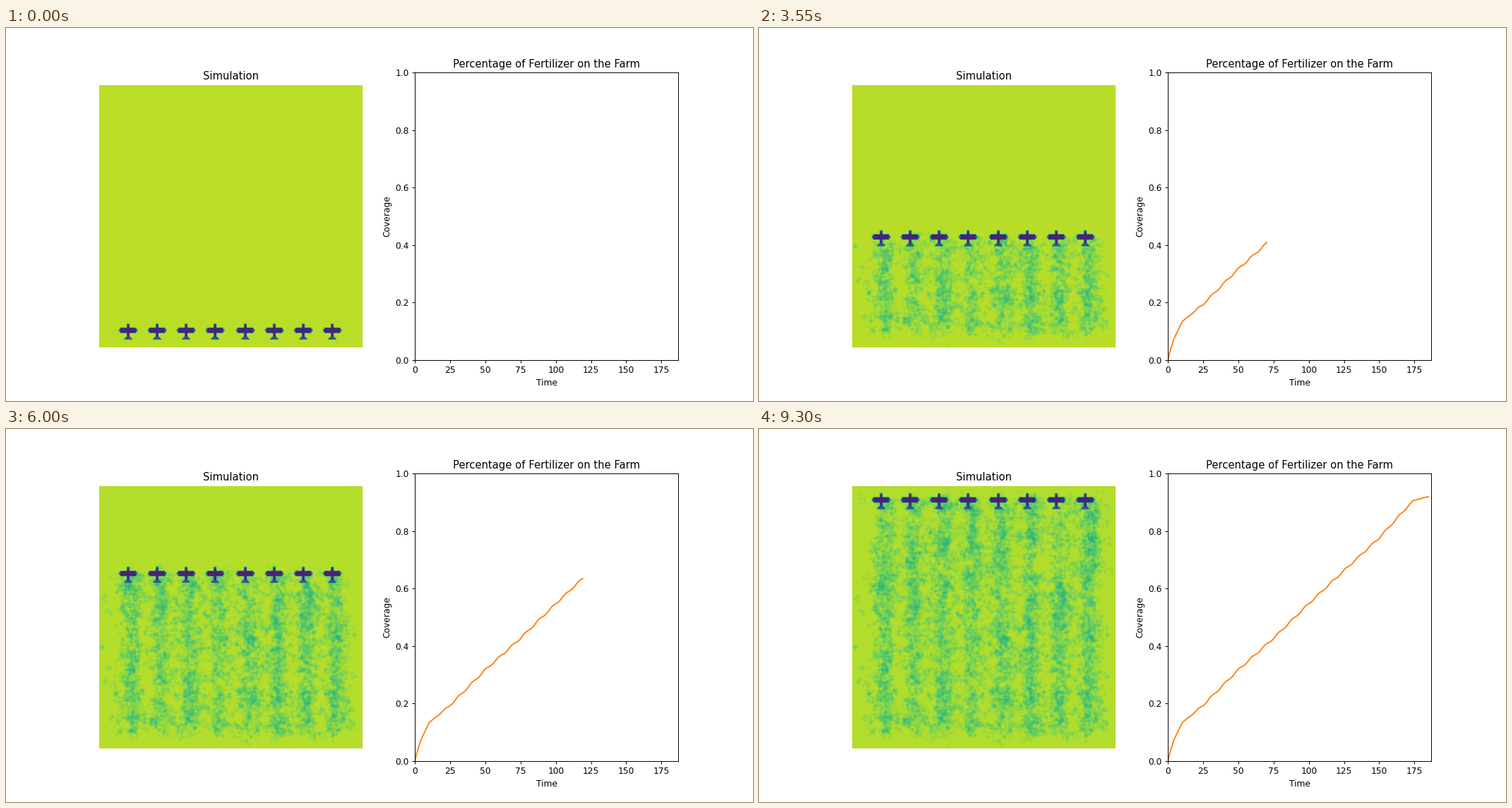
A matplotlib script for the animation above (9350 ms loop, 1058 by 529 pixels).

```python
import numpy as np
import matplotlib.pyplot as plt
from matplotlib.animation import FuncAnimation

FRAMES, INTERVAL = 187, 50
N = 200                      # field is N x N cells
START_ROW, LAST_STEP = 182, 176
PLANE_COLS = [15 + 22 * k + (k > 3) for k in range(8)]
BODY, EDGE = 0.1, 0.24
DROPS = 5                    # drops in one puff of spray
rng = np.random.default_rng(7)


def make_plane():
    """Plane sprite, 12 x 14 cells; NaN is see-through."""
    s = np.full((12, 14), np.nan)
    s[:, 6:8] = BODY
    s[0, 6:8] = EDGE
    s[3:7, 1:13] = BODY
    s[4:6, [0, 13]] = 0.32
    s[10, 5:9] = EDGE
    s[11, 4:10] = EDGE
    return s


def plane_row(i):
    return START_ROW - min(i, LAST_STEP)


def smooth_gain():
    """Strength of one plane's spray, drifting over time."""
    knots = np.arange(0, FRAMES + 7, 7)
    return np.interp(times, knots, rng.uniform(0.9, 3.1, knots.size))


def drops(col, row, rate):
    """Drop positions for one plane in one frame, clustered in puffs."""
    puffs = rng.poisson(rate)
    wide = rng.random(puffs) < 0.3
    far = rng.random(puffs) < 0.05
    px = col + 9.5 + rng.normal(size=puffs) * np.where(wide, 8, 3.6)
    py = row + 6.5 + rng.normal(size=puffs) * np.where(far, 6, 2.6)
    x = np.repeat(px, DROPS) + rng.normal(0, 1.7, puffs * DROPS)
    y = np.repeat(py, DROPS) + rng.normal(0, 1.7, puffs * DROPS)
    return np.rint(x).astype(int), np.rint(y).astype(int)


def splash(grid, x, y):
    """Add plus-shaped drops to the grid."""
    for dx, dy in [(0, 0), (1, 0), (-1, 0), (0, 1), (0, -1)]:
        cx, cy = x + dx, y + dy
        ok = (cx >= 0) & (cx < N) & (cy >= 0) & (cy < N)
        np.add.at(grid, (cy[ok], cx[ok]), 0.6 if dx or dy else 1)


def simulate():
    """Amount of fertilizer on every cell, for each frame."""
    gains = [smooth_gain() for _ in PLANE_COLS]
    amount = np.zeros((N, N))
    history = [amount.copy()]
    for i in range(1, FRAMES):
        fade = 0.25 if i > LAST_STEP else 1
        for col, gain in zip(PLANE_COLS, gains):
            splash(amount, *drops(col, plane_row(i), gain[i] * fade))
        history.append(amount.copy())
    return history


def field(i):
    base = 0.898 - 0.014 * i / (FRAMES - 1)
    grid = base - 0.3 * (1 - np.exp(-history[i] / 6))
    top = plane_row(i)
    for col in PLANE_COLS:
        spot = grid[top:top + 12, col:col + 14]
        spot[:] = np.where(np.isnan(sprite), spot, sprite)
    return grid


def coverage_curve():
    """Quick start, steady climb with small steps, flat end."""
    t = [0, 1, 4, 10, 24, 50, 75, 100, 125, 150, 174, 186]
    v = [0, .025, .072, .134, .19, .318, .428, .548, .663, .777, .906, .922]
    steps = 0.003 * np.sin(2 * np.pi * times / 9.5)
    climbing = np.clip(np.minimum(times - 12, LAST_STEP - times) / 10, 0, 1)
    return np.interp(times, t, v) + steps * climbing


times = np.arange(FRAMES)
sprite = make_plane()
history = simulate()
coverage = coverage_curve()

fig, (ax_sim, ax_cov) = plt.subplots(1, 2, figsize=(12, 6), dpi=1058 / 12)
image = ax_sim.imshow(field(0), cmap="viridis", vmin=0, vmax=1)
ax_sim.set_title("Simulation")
ax_sim.axis("off")

line, = ax_cov.plot([], [], color="C1")
ax_cov.set(xlim=(0, FRAMES), ylim=(0, 1), xlabel="Time", ylabel="Coverage",
           title="Percentage of Fertilizer on the Farm")


def update(i):
    image.set_data(field(i))
    line.set_data(times[:i], coverage[:i])
    return image, line


anim = FuncAnimation(fig, update, frames=FRAMES, interval=INTERVAL,
                     init_func=lambda: update(0), repeat=True, repeat_delay=0)
plt.show()
```
